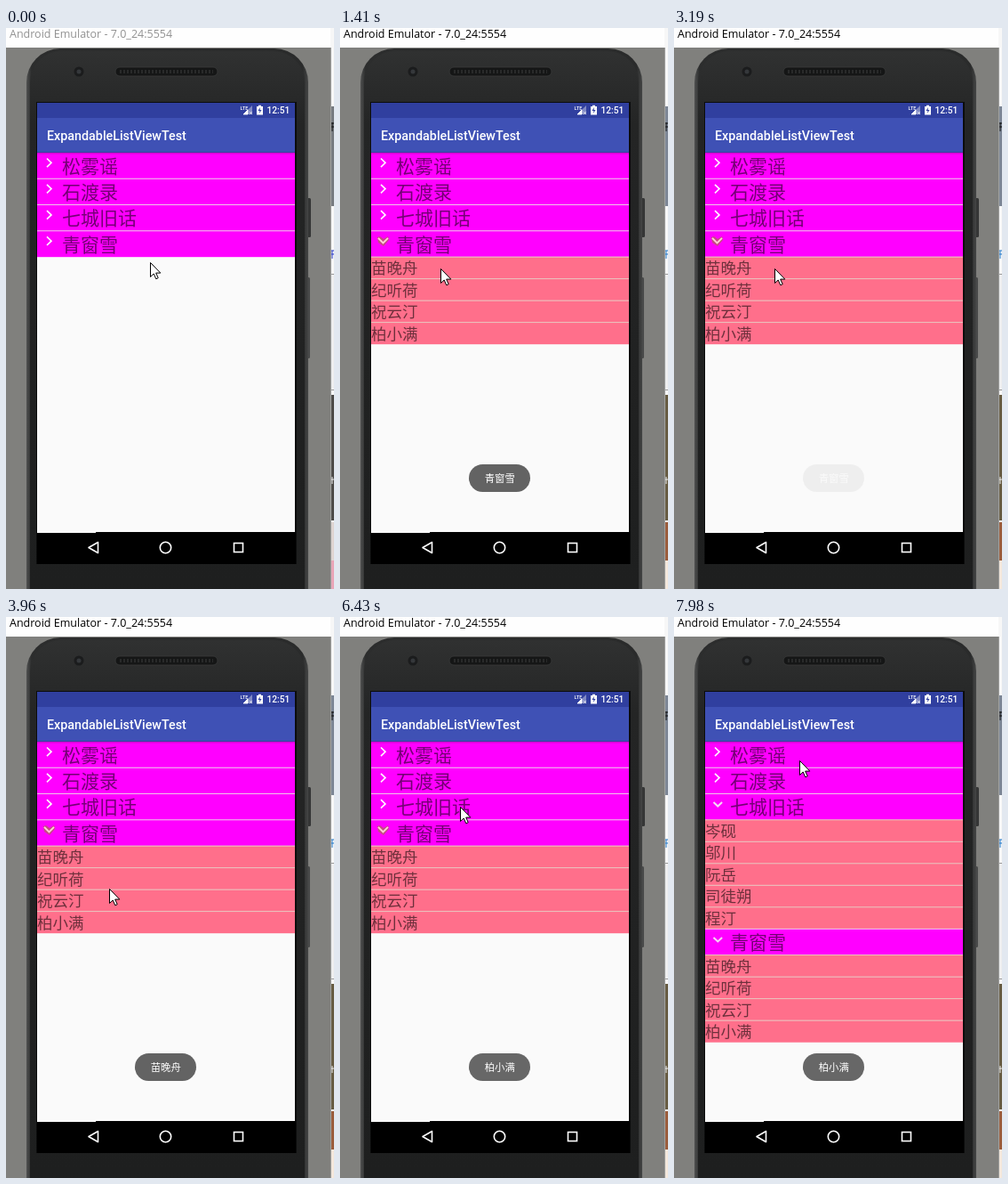
Animation, 369 px wide and 630 px high, one loop 8000 ms. Source, as an HTML page:

```html
<!DOCTYPE html>
<html lang="zh-CN">
<head>
<meta charset="utf-8">
<title>Expandable list</title>
<style>
  html, body { margin: 0; width: 100%; height: 100%; overflow: hidden; background: #80807d; }
  svg { display: block; width: 369px; height: 630px; }
  .cjk { font-family: "Noto Sans CJK SC", "Noto Sans CJK", sans-serif; }
  .ui { font-family: Roboto, sans-serif; font-weight: 500; fill: #fff; }
  .group { font-size: 21px; fill: #000; fill-opacity: .54; }
  .child { font-size: 17.5px; fill: #000; fill-opacity: .57; }
  .line { fill: none; stroke: #fff; stroke-width: 1.6; }
</style>
</head>
<body>
<svg viewBox="0 0 369 630">
  <defs>
    <linearGradient id="rim">
      <stop offset="0" stop-color="#505151"/>
      <stop offset=".018" stop-color="#2c2d2d"/>
      <stop offset=".98" stop-color="#2a2b2b"/>
      <stop offset="1" stop-color="#454646"/>
    </linearGradient>
    <linearGradient id="face" x2="0" y2="1">
      <stop offset="0" stop-color="#303131"/>
      <stop offset=".12" stop-color="#242525"/>
      <stop offset="1" stop-color="#1d1e1e"/>
    </linearGradient>
    <linearGradient id="shade" x2="0" y2="1">
      <stop offset="0" stop-opacity=".25"/>
      <stop offset="1" stop-opacity="0"/>
    </linearGradient>
  </defs>

  <rect width="369" height="630" fill="#80807d"/>
  <rect width="366" height="22" fill="#fefefe"/>
  <text id="caption" x="4" y="11" font-family="Open Sans, sans-serif" font-size="12.5">Android Emulator - 7.0_24:5554</text>
  <g id="backdrop"></g>

  <!-- phone -->
  <rect x="338" y="191" width="5" height="44" rx="1.5" fill="#353636"/>
  <rect x="338" y="280" width="4" height="91" rx="1.5" fill="#494a4a"/>
  <rect x="23" y="23" width="317" height="680" rx="38" fill="url(#rim)"/>
  <rect x="27" y="26" width="309" height="680" rx="35" fill="url(#face)"/>
  <circle cx="82" cy="49" r="5.5" fill="#1b1c1d"/>
  <circle cx="82" cy="49" r="2.5" fill="#35383b"/>
  <rect x="123" y="44" width="115" height="10" rx="5" fill="#151616" stroke="#3a3b3b" stroke-width=".8"/>
  <path d="M128 49H233" stroke="#292a2a" stroke-width="4" stroke-dasharray="2 2"/>

  <!-- screen -->
  <rect x="34" y="83" width="293" height="519" fill="#0b0c0c"/>
  <rect x="35" y="84" width="290" height="483" fill="#fafafa"/>
  <rect x="35" y="84" width="290" height="17" fill="#303f9f"/>
  <rect x="35" y="101" width="290" height="39" fill="#3f51b5"/>
  <text class="ui" x="46" y="126" font-size="14.3">ExpandableListViewTest</text>
  <text class="ui" x="293.5" y="96" font-size="10.2">12:51</text>
  <text class="ui" x="263.5" y="92" font-size="5.5">LTE</text>
  <path d="M267 97L277 87V97Z" fill="#fff" fill-opacity=".4"/>
  <path d="M267 97L272 92V97ZM274 94l3 3m0-3l-3 3" fill="#fff" stroke="#fff" stroke-width=".8"/>
  <path d="M282 88h2v-1.3h3V88h2v9.4h-7Z" fill="#fff"/>
  <path d="M286 89l-2.5 4h2l-.7 3 2.8-4h-2Z" fill="#303f9f"/>
  <g id="list"></g>
  <rect x="35" y="139.5" width="290" height="3" fill="url(#shade)"/>
  <rect x="35" y="567" width="291" height="35"/>
  <rect x="101" y="566" width="225" height="1"/>
  <g class="line">
    <path d="M103.5 577.5V589.5L93 583.5Z" stroke-linejoin="round"/>
    <circle cx="179.5" cy="583.5" r="6.2"/>
    <rect x="256.5" y="578.5" width="10" height="10"/>
  </g>

  <g id="toast">
    <rect x="145" y="490" width="69" height="31" rx="15.5" fill="#636363"/>
    <text id="message" class="cjk" x="179.8" y="510" font-size="11.4" text-anchor="middle" fill="#fff"></text>
  </g>
  <path id="cursor" d="M.5 .5V16.5L4.2 13L6.8 18.8L9.2 17.7L6.7 12.1H11.8Z" fill="#fff" stroke="#000"/>
</svg>

<script>
const LOOP = 8000, FOCUS = 540, OPEN_LAST = 780, OPEN_THIRD = 7130;
const $ = id => document.getElementById(id);

const books = [
  { name: '松雾谣', children: [] },
  { name: '石渡录', children: [] },
  { name: '七城旧话', children: ['岑砚', '邬川', '阮岳', '司徒朔', '程汀'] },
  { name: '青窗雪', children: ['苗晚舟', '纪听荷', '祝云汀', '柏小满'] }
];

// start, end, number of redraws
const bursts = [
  [70, 230, 4], [780, 1410, 9], [2880, 3190, 5], [3570, 4040, 7],
  [5590, 5900, 5], [6130, 6430, 5], [7510, 7980, 7]
];
// time, x, y
const cursorKeys = [
  [17, 162, 263], [230, 160, 237], [860, 160, 237], [1410, 113, 270],
  [3720, 113, 270], [4040, 118, 339], [6130, 118, 339], [6430, 135, 213],
  [7432, 135, 213], [7980, 141, 161]
];
// time, opacity
const toastKeys = [
  [780, 0], [1100, 1], [2800, 1], [2880, .87], [3190, .07], [3569, .07],
  [3570, .15], [3880, 1], [5510, 1], [5590, .87], [5900, .07], [6129, .07],
  [6130, .15], [6430, .97]
];

function snap(t) {
  let last = 0;
  for (const [start, end, count] of bursts) {
    if (t < start) break;
    const gap = (end - start) / (count - 1);
    last = Math.min(end, start + Math.floor((t - start) / gap + .001) * gap);
  }
  return last;
}

function sample(keys, t) {
  const next = keys.findIndex(key => key[0] > t);
  if (next === 0) return keys[0].slice(1);
  if (next < 0) return keys[keys.length - 1].slice(1);
  const a = keys[next - 1], b = keys[next];
  const p = (t - a[0]) / (b[0] - a[0]);
  return a.slice(1).map((v, i) => v + (b[i + 1] - v) * p);
}

const rect = (x, y, w, h, fill) =>
  `<rect x="${x}" y="${y}" width="${w}" height="${h}" fill="${fill}"/>`;

function indicator(y, open, stage) {
  if (!open) return `<path class="line" stroke-width="2" d="M46 ${y + 6.5}l5 4.8-5 4.8"/>`;
  if (stage === 2) return `<path d="M44.5 ${y + 9.5}l4.8 4.5 4.8-4.5" fill="none" stroke="#f4d9f4" stroke-width="2"/>`;
  return `<path d="M42 ${y + 7}l3-1 4 3 5-3 1 4-6 7-6-4z" fill="#c64b83"/>
    <path d="M43 ${y + 8}l5.5 5.5 5.5-5.5" fill="none" stroke="#ffd0d5" stroke-width="2"/>`;
}

function drawList(stage) {
  let y = 140, out = '';
  const row = (height, fill, kind, x, baseline, label) => {
    out += rect(35, y, 290, height, fill) +
      `<text class="cjk ${kind}" x="${x}" y="${y + baseline}">${label}</text>`;
  };
  const divider = color => { out += rect(35, y - .6, 290, 1, color); };
  books.forEach((book, i) => {
    const open = (i === 3 && stage > 0) || (i === 2 && stage > 1);
    row(29.3, '#ff00ff', 'group', 63, 22.7, book.name);
    out += indicator(y, open, stage);
    if (i) divider('#f0c4ea');
    y += 29.3;
    if (open) for (const name of book.children) {
      row(24.5, '#ff6f8b', 'child', 35, 18.8, name);
      divider('#e9c3bd');
      y += 24.5;
    }
  });
  $('list').innerHTML = out;
}

// sliver of the windows behind the emulator
function drawBackdrop(focused) {
  const bands = focused
    ? [[88, 112, '#7d8796'], [412, 141, '#675c43'], [555, 43, '#9b5d3c'], [598, 32, '#f4e8dc']]
    : [[88, 112, '#777b80'], [412, 141, '#4d4b49'], [555, 43, '#dfd5d2'], [598, 32, '#e9a6b8']];
  const ink = focused ? '#2378c8' : '#2638c8';
  $('backdrop').innerHTML = rect(365, 0, 4, 630, '#f7f7f7') +
    rect(366, 276, 3, 130, '#eeeeef') +
    bands.map(([y, h, fill]) => rect(366, y, 3, h, fill)).join('') +
    rect(365, 22, 1, 608, '#a2a3a2') +
    rect(366, 276, 3, 1, '#999') + rect(366, 406, 3, 1, '#999') +
    `<path d="M366 107h3m-3 4h3m-2-5v10" stroke="#111"/>
     <path d="M366 250h3m-3 4h3m-2-4v9" stroke="${ink}"/>
     <path d="M366 507h3m-2-3v8" stroke="#eee"/>`;
  $('caption').setAttribute('fill', focused ? '#000' : '#929292');
}

let shownStage, shownFocus;
function render(t) {
  const stage = t >= OPEN_THIRD ? 2 : t >= OPEN_LAST ? 1 : 0;
  const focused = t >= FOCUS;
  if (stage !== shownStage) drawList(shownStage = stage);
  if (focused !== shownFocus) drawBackdrop(shownFocus = focused);

  const drawn = snap(t);
  const [x, y] = sample(cursorKeys, drawn).map(Math.round);
  $('cursor').setAttribute('transform', `translate(${x} ${y})`);
  $('toast').setAttribute('opacity', sample(toastKeys, drawn)[0]);
  const last = books[3];
  $('message').textContent =
    t < 3570 ? last.name : t < 6130 ? last.children[0] : last.children[3];
}

const begin = performance.now();
function tick() {
  render((performance.now() - begin) % LOOP);
  requestAnimationFrame(tick);
}
tick();
</script>
</body>
</html>
```
